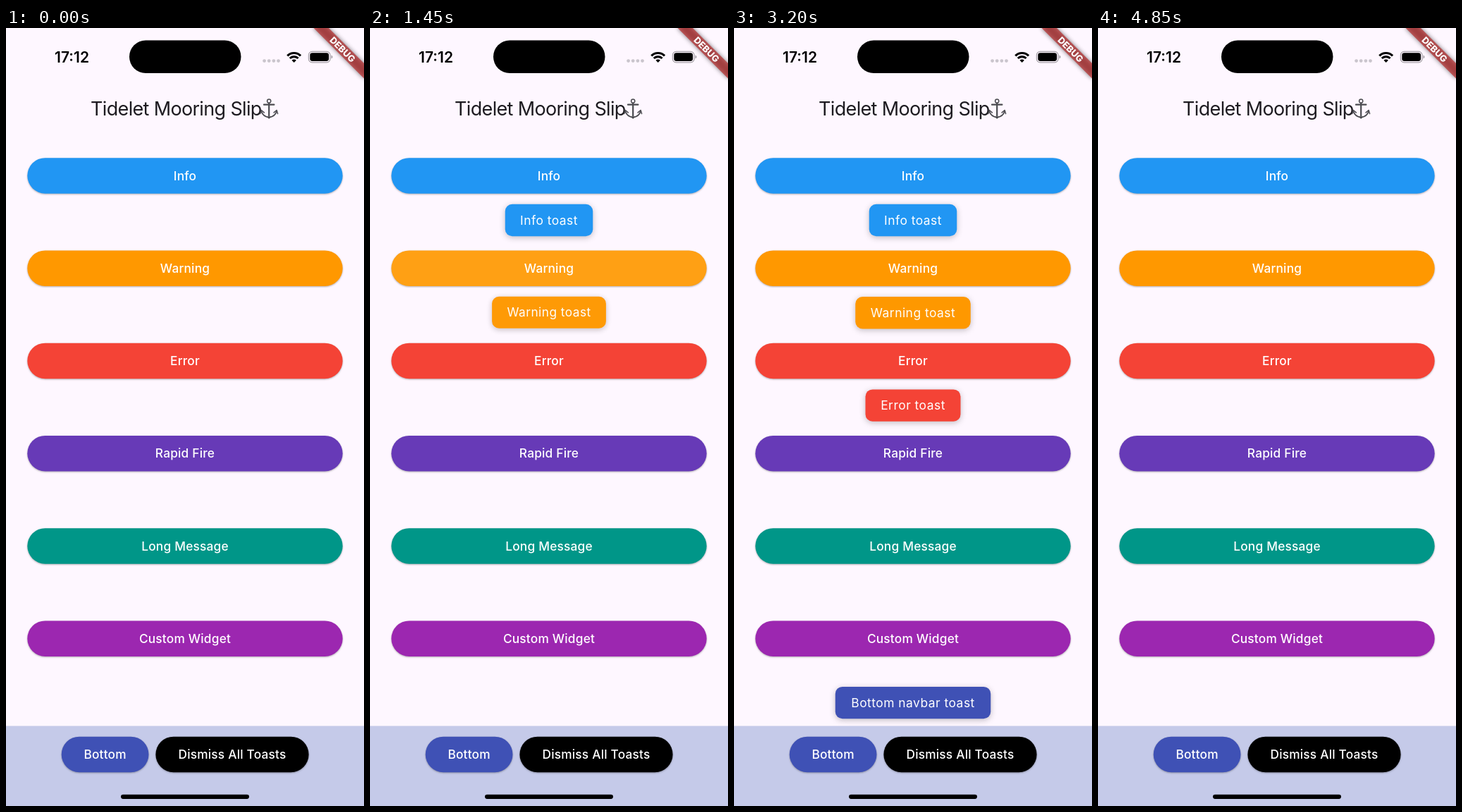
An HTML page for the animation above (5.05 s loop, 508 by 1103 pixels).

```html
<!DOCTYPE html>
<html lang="en">
<head>
<meta charset="utf-8">
<title>Toast demo</title>
<style>
  html, body { margin: 0; width: 100%; height: 100%; overflow: hidden; background: #fef7ff; }
  svg { display: block; width: 100%; height: 100%; }
  text { font-family: Inter, Roboto, sans-serif; }
  .label { font-size: 17.3px; font-weight: 500; letter-spacing: .2px; fill: #fff; text-anchor: middle; }
  .message { font-size: 17.4px; letter-spacing: .5px; fill: #fff; text-anchor: middle; }
  .raised { filter: drop-shadow(0 1.4px 1.2px rgba(0, 0, 0, .3)); }
  .floating { filter: drop-shadow(0 2.5px 4.5px rgba(0, 0, 0, .24)); }
</style>
</head>
<body>
<svg id="stage" viewBox="0 0 508 1103" preserveAspectRatio="none">
  <rect width="508" height="1103" fill="#fef7ff"/>

  <text x="93.5" y="48.6" font-size="21" font-weight="600" text-anchor="middle">17:12</text>
  <rect x="175" y="17.5" width="158.5" height="46.5" rx="23.25"/>
  <g fill="#cac5cd">
    <circle cx="366.6" cy="46.6" r="2.4"/><circle cx="373.2" cy="46.6" r="2.4"/>
    <circle cx="379.9" cy="46.6" r="2.4"/><circle cx="386.5" cy="46.6" r="2.4"/>
  </g>
  <g fill="none" stroke="#000" stroke-width="3.1">
    <path d="M399.3 39.3a13.4 13.4 0 0 1 18.8 0"/>
    <path d="M402.8 43a8.4 8.4 0 0 1 11.8 0"/>
  </g>
  <path d="M408.7 49l-3.2-3.3a4.6 4.6 0 0 1 6.4 0z"/>
  <rect x="429.4" y="33.4" width="30.6" height="15.4" rx="5" fill="none" stroke="#a39ea5" stroke-width="1.2"/>
  <rect x="431.3" y="35.3" width="26.8" height="11.6" rx="3.4"/>
  <path d="M461.5 38.6q2 .8 2 2.5t-2 2.5z" fill="#a39ea5"/>

  <text x="120" y="123.6" font-size="27" letter-spacing="-.65" fill="#1d1b20">Tidelet Mooring Slip</text>
  <g fill="none" stroke="#4b4b50" stroke-width="1.8" stroke-linecap="round" stroke-linejoin="round">
    <circle cx="373.2" cy="103.6" r="2.6" stroke-width="1.5"/>
    <path d="M373.2 106.5V125M366 108.7h14.4" stroke-width="2.2"/>
    <path d="M362.5 118.5q2.2 7 10.7 8.2q8.5-1.200 10.7-8.200"/>
    <path d="M360.800 121.500l1.500-5l4 3.400M385.600 121.500l-1.500-5l-4 3.400M371 126l2.200 1.800l2.200-1.800" stroke-width="1.500"/>
  </g>

  <rect y="989.500" width="508" height="113.500" fill="#c5cae9"/>
  <g id="buttons"></g>
  <rect x="163" y="1086.700" width="182" height="6.200" rx="3.100"/>
  <g id="toasts"></g>

  <g transform="translate(508 0) rotate(45)">
    <rect x="-50.500" y="35.400" width="101" height="15.200" opacity=".5" style="filter:blur(3.300px)"/>
    <rect x="-50.500" y="35.400" width="101" height="15.200" fill="#b71c1c" fill-opacity=".627"/>
    <text y="47.700" font-size="12.900" font-weight="800" fill="#fff" text-anchor="middle">DEBUG</text>
  </g>
</svg>
<script>
const LOOP = 5050, STEP = 50, TOAST_MS = 300;
const BUTTON_H = 50.5, TOAST_H = 45.4;

const clamp = v => Math.min(1, Math.max(0, v));
const mix = (a, b, k) => a + (b - a) * k;

function bezier(x1, y1, x2, y2) {
  const at = (a, b, s) => 3 * a * s * (1 - s) ** 2 + 3 * b * s * s * (1 - s) + s ** 3;
  return x => {
    let lo = 0, hi = 1;
    for (let i = 0; i < 24; i++) {
      const mid = (lo + hi) / 2;
      if (at(x1, x2, mid) < x) lo = mid; else hi = mid;
    }
    return at(y1, y2, (lo + hi) / 2);
  };
}
const ease = bezier(.25, .1, .25, 1);
const easeOut = bezier(0, 0, .58, 1);

function add(parent, tag, attrs = {}, text = '') {
  const node = document.createElementNS('http://www.w3.org/2000/svg', tag);
  set(node, attrs);
  node.textContent = text;
  parent.appendChild(node);
  return node;
}
function set(node, attrs) {
  for (const key in attrs) node.setAttribute(key, attrs[key]);
}

const buttonLayer = document.getElementById('buttons');
const toastLayer = document.getElementById('toasts');
const rowY = row => 184.2 + row * 131.25;

// tap: [x, y, pointer down, pointer up]; toast: [text, width, centre y, fade start]
const buttons = [
  { text: 'Info', fill: '#2196f3', y: rowY(0), tap: [252, 209, 560, 650], toast: ['Info toast', 124.5, 272.5, 3690] },
  { text: 'Warning', fill: '#ff9800', y: rowY(1), tap: [252, 341, 1140, 1190], toast: ['Warning toast', 163.5, 403.8, 3185] },
  { text: 'Error', fill: '#f44336', y: rowY(2), tap: [252, 472, 1690, 1795], toast: ['Error toast', 135, 535.1, 3800] },
  { text: 'Rapid Fire', fill: '#673ab7', y: rowY(3) },
  { text: 'Long Message', fill: '#009688', y: rowY(4) },
  { text: 'Custom Widget', fill: '#9c27b0', y: rowY(5) },
  { text: 'Bottom', fill: '#3f51b5', x: 78.7, w: 123.8, y: 1004.7, tap: [162, 1027, 2430, 2520], toast: ['Bottom navbar toast', 220.5, 956.6, 4540] },
  { text: 'Dismiss All Toasts', fill: '#000', x: 212.4, w: 217.2, y: 1004.7 }
].map((spec, i) => build({ x: 30.3, w: 447.4, ...spec }, i));

function build(b, i) {
  b.cx = b.x + b.w / 2;
  b.cy = b.y + BUTTON_H / 2;
  const shape = { x: b.x, y: b.y, width: b.w, height: BUTTON_H, rx: BUTTON_H / 2 };
  add(buttonLayer, 'rect', { ...shape, fill: b.fill, class: 'raised' });
  if (b.tap) {
    add(add(buttonLayer, 'clipPath', { id: 'clip' + i }), 'rect', shape);
    b.glow = add(buttonLayer, 'rect', { ...shape, fill: '#fff' });
    b.ripple = add(add(buttonLayer, 'g', { 'clip-path': `url(#clip${i})` }), 'circle', { fill: '#fff' });
    const [text, width] = b.toast;
    b.card = add(toastLayer, 'g');
    add(b.card, 'rect', {
      x: -width / 2, y: -TOAST_H / 2, width, height: TOAST_H, rx: 10, fill: b.fill, class: 'floating'
    });
    add(b.card, 'text', { y: 6.2, class: 'message' }, text);
  }
  add(buttonLayer, 'text', { x: b.cx, y: b.cy + 6.2, class: 'label' }, b.text);
  return b;
}

function drawPress(b, t) {
  const [x, y, down, up] = b.tap;
  const held = Math.min(t, up) - down, released = Math.max(0, t - up);
  const glow = clamp(held / 200) - released / 200;
  set(b.glow, { opacity: .1 * clamp(glow) });

  const spread = ease(clamp(held / 1000 + released / 225));
  const full = Math.hypot(b.w, BUTTON_H) / 2 + 6.3;
  set(b.ripple, {
    cx: mix(x, b.cx, spread),
    cy: mix(y, b.cy, spread),
    r: mix(.3, 1, spread) * full,
    opacity: .1 * clamp((t - down) / 75) * (1 - clamp((released - 225) / 150))
  });
}

function drawToast(b, t) {
  const [, , cy, hideAt] = b.toast;
  const shown = easeOut(clamp((t - b.tap[3]) / TOAST_MS));
  const kept = easeOut(1 - clamp((t - hideAt) / TOAST_MS));
  set(b.card, {
    opacity: shown * kept,
    transform: `translate(254 ${cy - 17 * (1 - shown)}) scale(${mix(.65, 1, shown)})`
  });
}

function render(t) {
  for (const b of buttons) {
    if (!b.tap) continue;
    drawPress(b, t);
    drawToast(b, t);
  }
}

const start = performance.now();
function tick(now) {
  const t = Math.max(0, now - start) % LOOP;
  render(Math.floor(t / STEP) * STEP);
  requestAnimationFrame(tick);
}
render(0);
requestAnimationFrame(tick);
</script>
</body>
</html>
```
